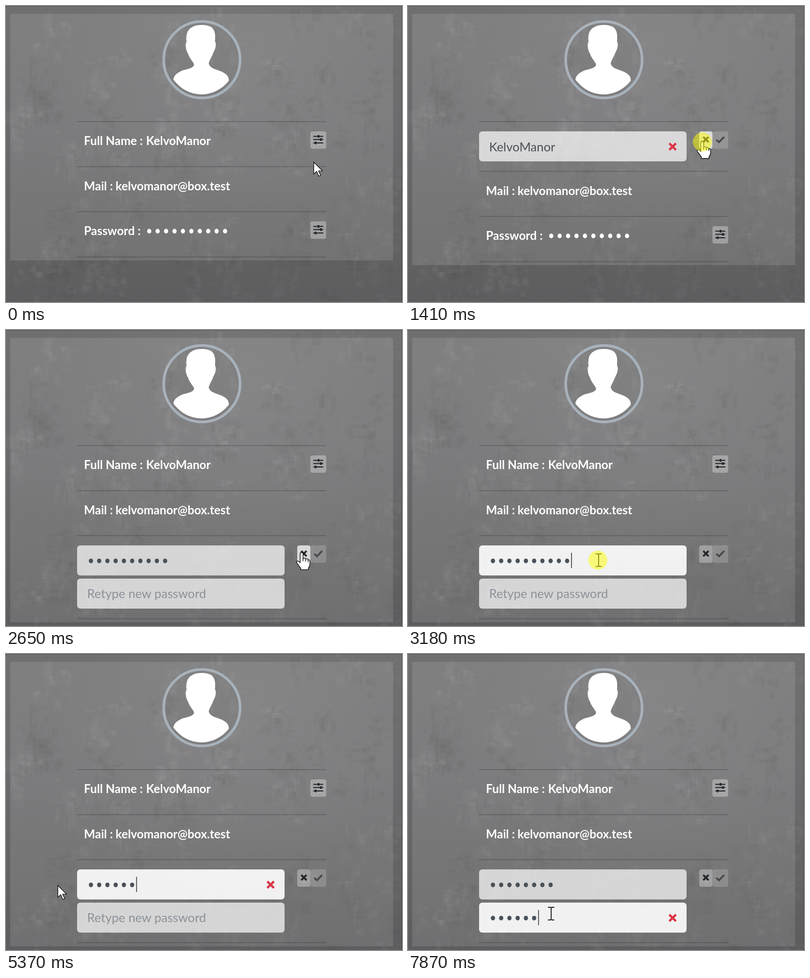
These frames come from a looping animation (752x562 px, 8 s). An HTML page with a canvas:

```html
<!DOCTYPE html>
<html lang="en">
<head>
<meta charset="utf-8">
<title>Profile settings</title>
<style>
  html, body { margin: 0; width: 100%; height: 100%; overflow: hidden; background: #666667; }
  canvas, svg { position: absolute; left: 0; top: 0; width: 752px; height: 562px; }
  text { font-family: Lato, "Open Sans", sans-serif; white-space: pre; }
  .label { font-size: 22.5px; font-weight: 700; fill: #fff; }
  .entry { font-size: 23.5px; fill: #495057; }
  .hint { font-size: 23.5px; fill: #8b9298; }
  .rule { stroke: #000; stroke-opacity: .22; stroke-width: 1.6; }
  .button, .field { fill: #fff; }
  .icon { fill: none; stroke: #212529; }
  .bad { fill: none; stroke: #dc3545; stroke-width: 4.2; }
  .caret { stroke: #222; stroke-width: 1.3; }
</style>
</head>
<body>
<canvas id="bg" width="752" height="562"></canvas>
<svg id="stage" viewBox="0 0 752 562">
  <defs>
    <g id="sliders" class="icon" stroke-width="1.9">
      <path d="M-9.5-6H9.5M-9.5 0H9.5M-9.5 6.5H9.5"/>
      <path d="M.5-8.6V-3.4M5-2.6V2.6M-5 3.9V9.1" stroke-width="3.2"/>
    </g>
    <path id="cross" d="M-5-5L5 5M5-5L-5 5"/>
    <path id="tick" d="M-7.5 .5L-2.5 5L7.5-5"/>
    <path id="redCross" class="bad" d="M-6.3-6.3L6.3 6.3M6.3-6.3L-6.3 6.3"/>
  </defs>
  <rect id="card" x="8" y="15" width="727" fill="#fff" fill-opacity=".115"/>

  <circle cx="372" cy="102" r="72.5" fill="#000" fill-opacity=".04" stroke="#a8b2bb" stroke-width="5"/>
  <path fill="#fff" d="M354 40C362 35 384 34 392 42C399 50 397 60 397 68C400 71 398 82 394 88C391 96 387 102 385 108
    C386 118 398 120 408 124C418 128 424 134 423 142Q403 167 371 168Q339 167 318 140C318 132 326 126 336 122
    C348 119 358 117 357 110C352 102 347 96 346 91C341 84 340 72 343 68C341 56 344 44 354 40Z"/>

  <path class="rule" d="M135 219.5H608" stroke-opacity=".18"/>
  <g id="nameView">
    <text class="label" x="148" y="264">Full Name :</text>
    <text class="label" x="266" y="264">KelvoManor</text>
    <rect id="nameEdit" class="button" x="578" y="238" width="30" height="33" rx="4"/>
    <use href="#sliders" x="593" y="253.5"/>
  </g>
  <g id="nameForm">
    <rect class="field" x="135" y="238" width="394" height="57" rx="6" fill-opacity=".7"/>
    <text class="entry" x="154" y="275.5">KelvoManor</text>
    <use href="#redCross" x="502.5" y="267"/>
  </g>

  <g id="lower">
    <path class="rule" d="M135 305H608M135 390.5H608"/>
    <text class="label" x="148" y="350">Mail :</text>
    <text class="label" x="208" y="350">kelvomanor@box.test</text>
    <g id="passView">
      <text class="label" x="148" y="435">Password :</text>
      <g id="mask" fill="#fff"></g>
      <rect id="passEdit" class="button" x="578" y="409" width="30" height="33" rx="4"/>
      <use href="#sliders" x="593" y="424.5"/>
    </g>
  </g>
  <g id="passForm">
    <rect id="newField" class="field" x="135" y="409" width="394" height="57" rx="6"/>
    <rect id="selection" y="423" height="29" fill="#3297fd"/>
    <g id="newDots"></g>
    <path id="newCaret" class="caret" d="M0 423V452"/>
    <use id="newBad" href="#redCross" x="502.5" y="438"/>
    <rect id="againField" class="field" x="135" y="472" width="394" height="57" rx="6"/>
    <text id="hint" class="hint" x="154" y="509">Retype new password</text>
    <g id="againDots"></g>
    <path id="againCaret" class="caret" d="M0 486V515"/>
    <use id="againBad" href="#redCross" x="502.5" y="501"/>
  </g>
  <path id="lastRule" class="rule" d="M135 0H608"/>

  <g id="actions">
    <rect id="cancel" class="button" x="553" y="238" width="25" height="33" rx="4"/>
    <rect class="button" x="578" y="238" width="30" height="33" rx="4" fill-opacity=".17"/>
    <use href="#cross" class="icon" x="565.7" y="253.5" stroke-width="3.5"/>
    <use href="#tick" class="icon" x="593" y="253.5" stroke-width="3.6" opacity=".65"/>
  </g>

  <g id="pointer">
    <g id="hand" fill="#fff" stroke="#111" stroke-width="1.3" stroke-linejoin="round">
      <path d="M-3 17V1.5a2.7 2.7 0 0 1 5.5 0V10q4-1.5 5 1q4-1 4.5 1.5q3.5 0 3.5 3V22q-1 4-3 6.5v3H-2v-3L-9 19q-1.5-3 .5-4q2-.5 5.5 3Z"/>
      <path d="M2.5 9V15M7.5 11V16M12 12.5V17" fill="none"/>
    </g>
    <path id="arrow" d="M.5 .5V23L6 18L10 27L13.5 25.5L9.5 17H17Z" fill="#fff" stroke="#111" stroke-width="1.2"/>
    <path id="beam" d="M-6-12H-1.5L0-11L1.5-12H6M0-11V11M-6 12H-1.5L0 11L1.5 12H6" fill="none" stroke="#111" stroke-width="1.7"/>
    <circle id="glow" r="18" fill="#ff0" fill-opacity=".5"/>
  </g>
  <path d="M0 .5H751.5V562" fill="none" stroke="#000" stroke-opacity=".25"/>
</svg>
<script>
const LOOP = 8000, STEP = 15.65, TEXT_X = 154;
const el = {};
document.querySelectorAll('[id]').forEach(n => el[n.id] = n);

// [time, x, y] of the pointer tip
const path = [
  [0, 584, 296], [60, 584, 296], [380, 593, 257], [600, 593, 257], [850, 553, 262],
  [940, 553, 262], [1180, 559, 258], [1630, 559, 258], [2120, 602, 421], [2560, 602, 421],
  [3100, 362, 437], [3260, 362, 437], [3650, 101, 438], [3760, 101, 439], [3810, 98, 439],
  [5720, 98, 439], [5860, 261, 481], [6240, 261, 481], [6420, 270, 492], [LOOP, 272, 493]
];
const presses = [[470, 550], [1410, 1480], [2410, 2500], [3180, 3650], [6480, 6620]];
const newKeys = [4110, 4290, 4580, 4830, 5140, 5370, 5610, 6010];
const againKeys = [6790, 7020, 7180, 7420, 7640, 7870];

const within = (t, a, b) => t >= a && t < b;
const show = (node, on) => node.style.display = on ? '' : 'none';
const set = (node, name, value) => node.setAttribute(name, value);
const typed = (keys, t) => keys.filter(k => t >= k).length;
const inside = (p, x, y, w, h) => p.x >= x && p.x < x + w && p.y >= y && p.y < y + h;

function pointerAt(t) {
  const i = Math.max(1, path.findIndex(p => p[0] > t));
  const [t0, x0, y0] = path[i - 1], [t1, x1, y1] = path[i];
  const k = (t - t0) / (t1 - t0);
  return { x: x0 + (x1 - x0) * k, y: y0 + (y1 - y0) * k };
}

function addDots(group, n, x, y, step) {
  for (let i = 0; i < n; i++) {
    const dot = document.createElementNS('http://www.w3.org/2000/svg', 'ellipse');
    set(dot, 'cx', x + i * step);
    set(dot, 'cy', y);
    set(dot, 'rx', 4);
    set(dot, 'ry', 4.4);
    group.append(dot);
  }
}

function paintWall() {
  const c = el.bg.getContext('2d');
  let seed = 41;
  const rnd = () => (seed = seed * 16807 % 2147483647) / 2147483647;
  const fade = c.createLinearGradient(0, 0, 0, 562);
  fade.addColorStop(0, '#6f6f70');
  fade.addColorStop(.4, '#6b6b6d');
  fade.addColorStop(.85, '#616162');
  fade.addColorStop(1, '#5d5d5f');
  c.fillStyle = fade;
  c.fillRect(0, 0, 752, 562);
  const light = c.createRadialGradient(450, 120, 20, 450, 120, 360);
  light.addColorStop(0, 'rgba(255,255,255,.055)');
  light.addColorStop(1, 'rgba(255,255,255,0)');
  c.fillStyle = light;
  c.fillRect(0, 0, 752, 562);
  for (let i = 0; i < 110; i++) {
    const x = rnd() * 752, y = rnd() * 562, tall = 15 + rnd() * 45;
    c.fillStyle = rnd() < .5 ? 'rgba(0,0,0,.022)' : 'rgba(255,255,245,.018)';
    for (let j = 0; j < 16; j++) {
      c.fillRect(Math.round(x + (rnd() - .5) * 50), Math.round(y + (rnd() - .5) * tall * 1.6),
        3 + rnd() * 14, 2 + rnd() * tall * .5);
    }
  }
}

function drawField(field, dots, caret, count, focused, caretOn) {
  set(field, 'fill-opacity', focused ? .9 : .7);
  [...dots.children].forEach((d, i) => show(d, i < count));
  show(caret, caretOn);
  set(caret, 'transform', `translate(${TEXT_X + count * STEP})`);
}

function render(t) {
  const p = pointerAt(t);
  const editName = within(t, 550, 1480), editPass = t >= 2500;
  const shift = editName ? 9 : 0;

  set(el.card, 'height', editPass ? 540 : 468 + shift);
  set(el.lower, 'transform', `translate(0 ${shift})`);
  set(el.lastRule, 'transform', `translate(0 ${editPass ? 548 : 476.5 + shift})`);
  show(el.nameView, !editName);
  show(el.nameForm, editName);
  show(el.passView, !editPass);
  show(el.passForm, editPass);
  show(el.actions, editName || editPass);
  const top = editPass ? 409 : 238;
  set(el.actions, 'transform', `translate(0 ${top - 238})`);

  const hot = {
    nameEdit: !editName && inside(p, 578, 238, 30, 33),
    passEdit: !editPass && inside(p, 578, 409 + shift, 30, 33),
    cancel: (editName || editPass) && inside(p, 553, top, 25, 33)
  };
  for (const id in hot) set(el[id], 'fill-opacity', hot[id] ? .72 : .31);

  const onNew = within(t, 3180, 6480), onAgain = t >= 6480;
  const count = t < newKeys[0] ? 10 : typed(newKeys, t);
  const again = typed(againKeys, t);

  // dragging left selects the bullets the pointer has passed
  const first = within(t, 3260, newKeys[0])
    ? Math.min(10, Math.max(0, Math.round((p.x - TEXT_X) / STEP))) : 10;
  const selecting = first < 10;
  show(el.selection, selecting);
  set(el.selection, 'x', TEXT_X + first * STEP);
  set(el.selection, 'width', (10 - first) * STEP);
  [...el.newDots.children].forEach((d, i) => set(d, 'fill', i >= first ? '#fff' : '#495057'));

  drawField(el.newField, el.newDots, el.newCaret, count, onNew, onNew && !selecting);
  drawField(el.againField, el.againDots, el.againCaret, again, onAgain, onAgain);
  show(el.newBad, count < 8);
  show(el.againBad, again > 0);
  show(el.hint, again === 0);

  const overField = editName && inside(p, 135, 238, 394, 57) ||
    editPass && (inside(p, 135, 409, 394, 57) || inside(p, 135, 472, 394, 57));
  const overButton = hot.nameEdit || hot.passEdit || hot.cancel;
  show(el.hand, overButton);
  show(el.beam, overField);
  show(el.arrow, !overButton && !overField);
  show(el.glow, presses.some(([a, b]) => within(t, a, b)));
  set(el.glow, 'cx', overField ? -1.5 : 0);
  set(el.pointer, 'transform', `translate(${p.x.toFixed(1)} ${p.y.toFixed(1)})`);
}

paintWall();
addDots(el.mask, 10, 272, 427.5, 16);
addDots(el.newDots, 10, 161.3, 438.3, STEP);
addDots(el.againDots, 8, 161.3, 501.3, STEP);
el.againDots.setAttribute('fill', '#495057');

const start = performance.now();
function tick() {
  render((performance.now() - start) % LOOP);
  requestAnimationFrame(tick);
}
tick();
</script>
</body>
</html>
```
